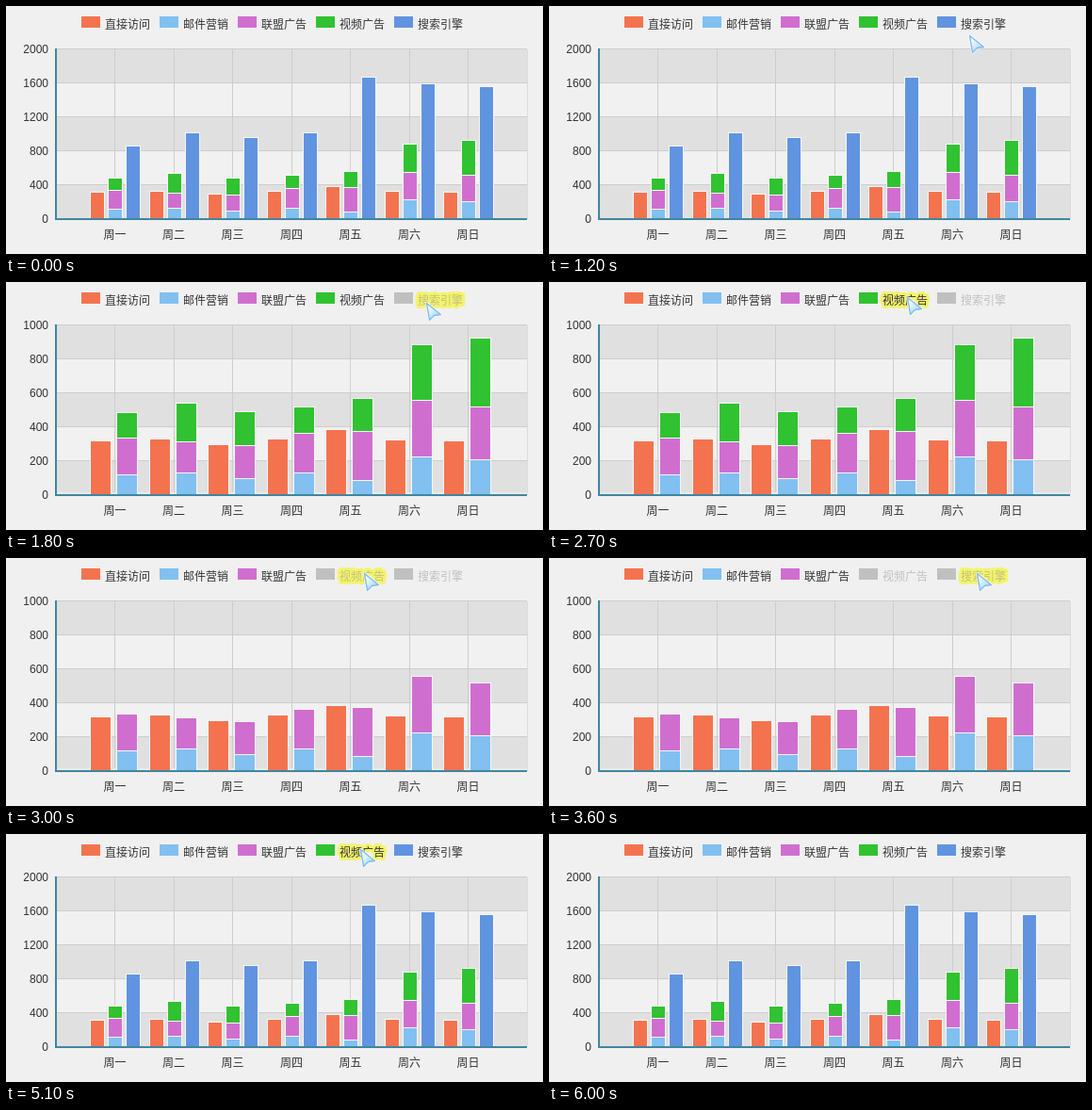
An HTML page for the animation above (6.3 s loop, 570 px wide and 263 px high).

```html
<!DOCTYPE html>
<html lang="zh-CN">
<head>
<meta charset="utf-8">
<title>堆叠柱状图</title>
<style>
  html, body { margin: 0; width: 100%; height: 100%; overflow: hidden; background: #f0f0f0; }
  svg { display: block; width: 570px; height: 263px; }
  text { font: 12px "Noto Sans CJK SC", "Noto Sans CJK", sans-serif; fill: #333; }
  .value { font-family: "Liberation Sans", Arial, sans-serif; text-anchor: end; }
  .day { text-anchor: middle; }
  .off rect { fill: #c0c0c0; }
  .off text { fill: #c0c0c0; }
  .hover-text text { stroke: #f3f36e; stroke-width: 6px; stroke-linejoin: round; paint-order: stroke; }
  .hover-text.off text { fill: #c2c27c; }
  .hover-icon rect { stroke: rgba(255, 255, 0, .55); stroke-width: 7px; }
</style>
</head>
<body>
<svg id="stage" viewBox="0 0 570 263">
  <defs>
    <linearGradient id="ice" x1="0" y1="0" x2=".7" y2="1">
      <stop offset=".25" stop-color="#f6fbff"/>
      <stop offset="1" stop-color="#9fd2f8"/>
    </linearGradient>
  </defs>
  <g id="grid" shape-rendering="crispEdges"></g>
  <g id="bars" shape-rendering="crispEdges"></g>
  <g id="axes" shape-rendering="crispEdges"></g>
  <g id="labels"></g>
  <g id="legend"></g>
  <g id="cursor" stroke-linejoin="round">
    <path d="M1.5 1.5L16.5 13.5L9.5 14.5L4.5 19.5Z" fill="none" stroke="#fff" stroke-opacity=".7" stroke-width="3"/>
    <path d="M1.5 1.5L16.5 13.5L9.5 14.5L4.5 19.5Z" fill="url(#ice)" stroke="#7fbdec" stroke-width="1.4"/>
  </g>
</svg>
<script>
const LOOP = 6300;
const LEFT = 53, TOP = 46, RIGHT = 553, BASE = 226, STEP = 62.5, BAND = 36;
const MAIL = 1, UNION = 2, VIDEO = 3, SEARCH = 4;

const series = [
  { name: '直接访问', color: '#f4734f', data: [320, 332, 301, 334, 390, 330, 320] },
  { name: '邮件营销', color: '#81c0f0', data: [120, 132, 101, 134, 90, 230, 210] },
  { name: '联盟广告', color: '#d06ed0', data: [220, 182, 191, 234, 290, 330, 310] },
  { name: '视频广告', color: '#30c230', data: [150, 232, 201, 154, 190, 330, 410] },
  { name: '搜索引擎', color: '#6094e0', data: [862, 1018, 964, 1026, 1679, 1600, 1570] }
];

const timeline = [
  { at: 0 },
  { at: 300, cursor: [460, 77] },
  { at: 1200, cursor: [445, 30] },
  { at: 1500, cursor: [445, 21], text: SEARCH },
  { at: 1800, cursor: [445, 21], text: SEARCH, off: [SEARCH] },
  { at: 2400, cursor: [414, 17], icon: SEARCH, off: [SEARCH] },
  { at: 2700, cursor: [379, 15], text: VIDEO, off: [SEARCH] },
  { at: 3000, cursor: [379, 15], text: VIDEO, off: [VIDEO, SEARCH] },
  { at: 3600, cursor: [453, 15], text: SEARCH, off: [VIDEO, SEARCH] },
  { at: 4200, cursor: [453, 15], text: SEARCH, off: [VIDEO] },
  { at: 4500, cursor: [375, 15], text: VIDEO, off: [VIDEO] },
  { at: 5100, cursor: [375, 15], text: VIDEO },
  { at: 5400, cursor: [552, 22], text: VIDEO },
  { at: 6000 }
];

const byId = id => document.getElementById(id);
const [grid, bars, axes, labels, legend, cursor] =
  ['grid', 'bars', 'axes', 'labels', 'legend', 'cursor'].map(byId);

function add(parent, tag, attrs, content = '') {
  const node = document.createElementNS(parent.namespaceURI, tag);
  for (const key in attrs) node.setAttribute(key, attrs[key]);
  node.textContent = content;
  return parent.appendChild(node);
}

const box = (parent, x, y, width, height, fill) =>
  add(parent, 'rect', { x, y, width, height, fill });

for (let i = 0; i < 5; i++) {
  box(grid, LEFT, TOP + i * BAND, RIGHT - LEFT, BAND, i % 2 ? '#f1f1f1' : '#e0e0e0');
}
for (let i = 0; i < 5; i++) box(grid, LEFT, TOP - 1 + i * BAND, RIGHT - LEFT, 1, '#cdcdcd');
for (let i = 1; i < 9; i++) {
  box(grid, Math.floor(LEFT + i * STEP), TOP, 1, BASE - TOP, i < 8 ? '#cdcdcd' : '#dcdcdc');
}
const baseGlow = box(grid, LEFT, BASE - 3, RIGHT - LEFT, 2, '#e6eceb');

box(axes, LEFT - 1, TOP - 1, 2, BASE - TOP + 2, '#3f86a0');
box(axes, LEFT - 1, BASE - 1, RIGHT - LEFT + 1, 2, '#3f86a0');

const values = Array.from({ length: 6 }, (_, i) =>
  add(labels, 'text', { class: 'value', x: 45, y: BASE + 4 - i * BAND }));
[...'一二三四五六日'].forEach((day, i) =>
  add(labels, 'text', { class: 'day', x: LEFT + (i + 1) * STEP, y: 246.5 }, '周' + day));

const entries = series.map(({ name, color }, i) => {
  const entry = add(legend, 'g', {});
  box(entry, 80 + i * 83, 11, 20, 12, color);
  add(entry, 'text', { x: 105 + i * 83, y: 23.5 }, name);
  return entry;
});

function drawBars(off) {
  const columns = [[0], [MAIL, UNION, VIDEO], [SEARCH]]
    .map(column => column.filter(i => !off.includes(i)))
    .filter(column => column.length);
  const max = off.includes(SEARCH) ? 1000 : 2000;
  const [width, pitch] = columns.length === 3 ? [14, 19] : [21, 28];
  const yOf = value => Math.round(BASE - value * (BASE - TOP) / max);

  bars.textContent = '';
  for (let day = 0; day < 7; day++) {
    const start = Math.floor(LEFT + (day + 1) * STEP - 25);
    columns.forEach((column, c) => {
      const x = start + c * pitch;
      let sum = 0;
      for (const i of column) {
        const bottom = yOf(sum);
        const top = yOf(sum += series[i].data[day]);
        box(bars, x - 1, top, width + 2, bottom - top, '#f6f6f6');
        box(bars, x, top + 1, width, bottom - top - 1, series[i].color);
      }
    });
  }
  values.forEach((label, i) => label.textContent = i * max / 5);
  baseGlow.style.display = max === 1000 ? '' : 'none';
}

let shown;
function show(state) {
  const { cursor: spot, text, icon, off = [] } = state;
  drawBars(off);
  entries.forEach((entry, i) => {
    entry.classList.toggle('off', off.includes(i));
    entry.classList.toggle('hover-text', text === i);
    entry.classList.toggle('hover-icon', icon === i);
  });
  cursor.style.display = spot ? '' : 'none';
  if (spot) cursor.setAttribute('transform', `translate(${spot})`);
  shown = state;
}

const begin = performance.now();
function tick() {
  const time = (performance.now() - begin) % LOOP;
  const state = timeline.filter(({ at }) => at <= time).pop();
  if (state !== shown) show(state);
  requestAnimationFrame(tick);
}
tick();
</script>
</body>
</html>
```
